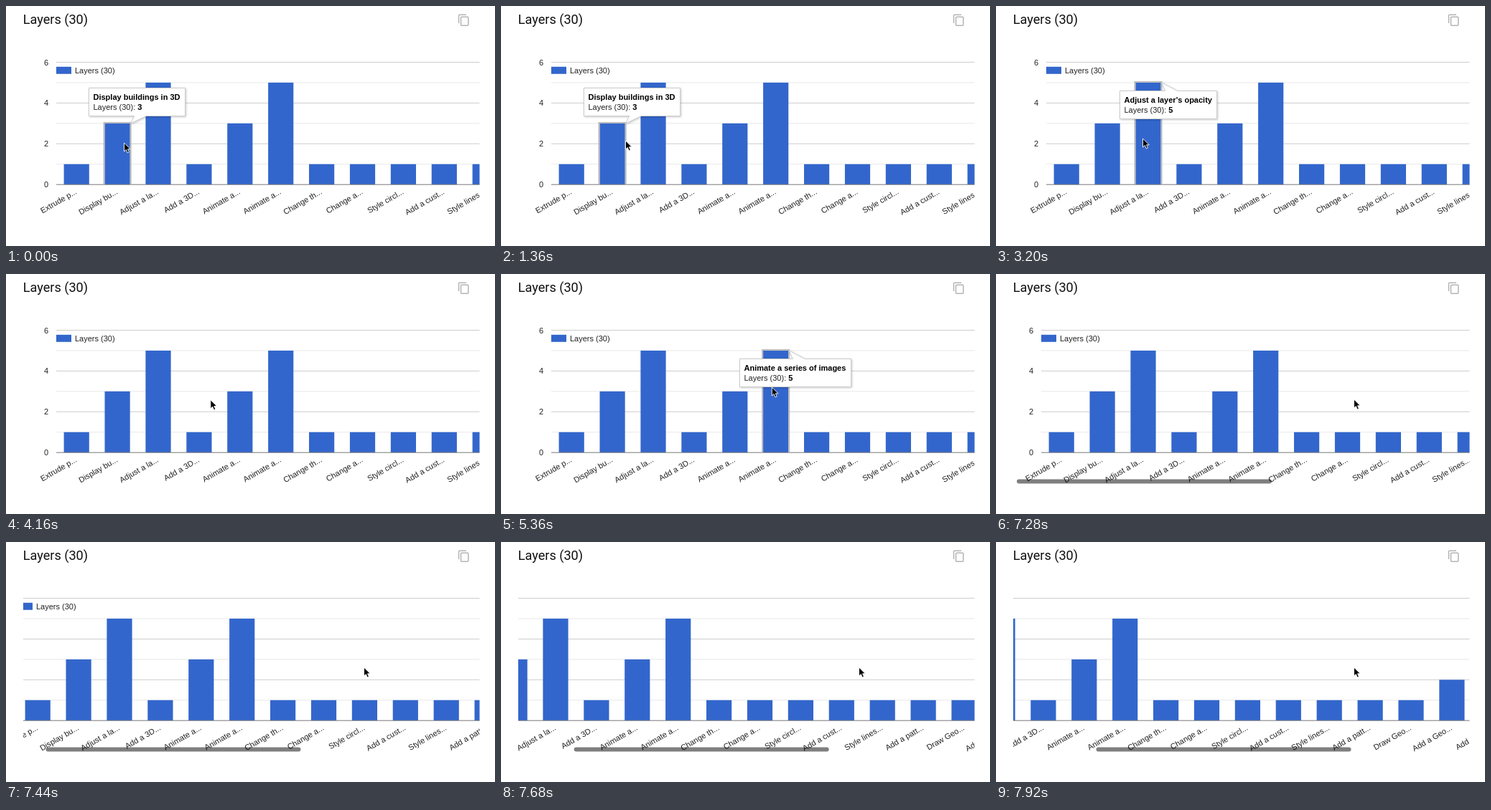
These frames come from a looping animation (681 px wide and 335 px high, 8000 ms). An HTML page:

```html
<!DOCTYPE html>
<html lang="en">
<head>
<meta charset="utf-8">
<title>Layers chart</title>
<style>
  html, body { margin: 0; width: 100%; height: 100%; overflow: hidden; background: #fff; }
  svg { display: block; width: 681px; height: 335px; }
  text { font: 11px "Liberation Sans", Arial, sans-serif; fill: #222; white-space: pre; }
  .heading { font: 18.1px Roboto, sans-serif; fill: #111; }
  .bold { font-weight: bold; fill: #000; }
  .end { text-anchor: end; }
  .box { filter: drop-shadow(1px 1px 1.5px rgba(0, 0, 0, .22)); }
</style>
</head>
<body>
<svg viewBox="0 0 681 335">
  <defs><clipPath id="view"><rect x="24" y="40" width="635.5" height="280"/></clipPath></defs>
  <text class="heading" x="23.8" y="24.7">Layers (30)</text>
  <g fill="none" stroke="#b4b4b4" stroke-width="1.5">
    <path d="M630.5 24V13.3q0-1 1-1H641"/>
    <rect x="633.5" y="15.3" width="10.3" height="12" rx="1"/>
  </g>
  <g clip-path="url(#view)">
    <g id="chart"></g>
    <rect id="thumb" y="286.5" width="355" height="6" rx="3" fill="#000" fill-opacity=".5"/>
  </g>
  <path id="cursor" d="M0 0V12L2.8 9.5L4.7 14L6.9 13L5 8.8H8.8Z" fill="#000" stroke="#fff" stroke-width=".9"/>
</svg>
<script>
const LOOP = 8000, STEP = 80;
const BASE = 249.2, UNIT = 28.45, LEFT = 80.6, PITCH = 56.9, BAR = 35.2;
const bars = [
  ['Extrude p', 1], ['Display bu', 3, 'Display buildings in 3D'],
  ['Adjust a la', 5, "Adjust a layer's opacity"], ['Add a 3D', 1],
  ['Animate a', 3, 'Animate a point'], ['Animate a', 5, 'Animate a series of images'],
  ['Change th', 1], ['Change a', 1], ['Style circl', 1], ['Add a cust', 1],
  ['Style lines', 1], ['Add a patt', 1], ['Draw Geo', 1], ['Add a Geo', 2], ['Add a line', 1]
];
// [start, end, bar index]
const hovers = [[0, 1520, 1], [1520, 4000, 2], [4240, 5040, 4], [5040, 6960, 5]];
// [time, x, y]
const pointer = [
  [0, 164.5, 191], [800, 164.5, 191], [1360, 173.5, 188], [1840, 204.5, 185], [3760, 204.5, 185],
  [4320, 317, 172], [4720, 325, 168], [5200, 377, 158], [6320, 379, 158],
  [6800, 425, 166], [7120, 498.5, 175]
];
// [time, offset]
const scroll = [[7200, 0], [7280, 7], [7360, 28], [7440, 54], [7600, 111], [7760, 161], [7920, 203]];

const byId = id => document.getElementById(id);
const chart = byId('chart');
const barX = i => LEFT + i * PITCH;
const valueY = v => BASE - v * UNIT;

function add(parent, tag, attrs, text) {
  const el = document.createElementNS('http://www.w3.org/2000/svg', tag);
  for (const name in attrs) el.setAttribute(name, attrs[name]);
  if (text) el.textContent = text;
  return parent.appendChild(el);
}

function gridLine(v, stroke) {
  add(chart, 'path', { d: `M70 ${valueY(v)}H1130`, stroke });
}

function drawChart() {
  for (let v = 1; v <= 6; v++) gridLine(v, v % 2 ? '#e8e8e8' : '#ccc');
  for (let v = 0; v <= 6; v += 2) {
    add(chart, 'text', { class: 'end', x: 59, y: valueY(v) + 4 }, String(v));
  }
  add(chart, 'rect', { x: 70, y: 84.8, width: 21, height: 10, fill: '#3366cc' });
  add(chart, 'text', { x: 96, y: 93.6 }, 'Layers (30)');
  bars.forEach(([label, value], i) => {
    const x = barX(i), y = valueY(value);
    add(chart, 'rect', { x, y, width: BAR, height: BASE - y, fill: '#3366cc' });
    add(chart, 'text', {
      class: 'end', transform: `translate(${x + BAR / 2 + 1.2} 261.5) rotate(-30)`
    }, label + '...');
  });
}

function makeTip(i) {
  const [, value, title] = bars[i];
  const x = barX(i), y = valueY(value), tipX = x + BAR + 1;
  const group = add(chart, 'g', { visibility: 'hidden' });
  add(group, 'path', {
    d: `M${x - 1} ${BASE}V${y - 1}H${x + BAR + 1}V${BASE}`,
    fill: 'none', stroke: '#b8b8b8', 'stroke-width': 1.8
  });
  const box = add(group, 'path', { class: 'box', fill: '#fff', stroke: '#ccc' });
  const above = value < 5;
  const top = Math.round(above ? y - 50 : y + 11) + .5, bottom = top + 39;
  const heading = add(group, 'text', { class: 'bold', y: top + 16 }, title);
  const width = Math.round(heading.getComputedTextLength() + 13);
  const left = Math.round(tipX + 9.5 - width / 2) - .5, right = left + width;
  heading.setAttribute('x', left + 6);
  const detail = add(group, 'text', { x: left + 6, y: top + 30 }, 'Layers (30): ');
  add(detail, 'tspan', { class: 'bold' }, String(value));
  const a = tipX + 5, b = tipX + 22;
  box.setAttribute('d', above
    ? `M${left} ${top}H${right}V${bottom}H${b}L${tipX} ${y}L${a} ${bottom}H${left}Z`
    : `M${left} ${top}H${a}L${tipX} ${y}L${b} ${top}H${right}V${bottom}H${left}Z`);
  return group;
}

// Piecewise linear value of one column of a key list.
function at(keys, t, col) {
  const next = keys.findIndex(k => k[0] > t);
  if (next === 0) return keys[0][col];
  if (next < 0) return keys[keys.length - 1][col];
  const p = keys[next - 1], q = keys[next];
  return p[col] + (q[col] - p[col]) * (t - p[0]) / (q[0] - p[0]);
}

drawChart();
const tips = hovers.map(([start, end, i]) => ({ start, end, el: makeTip(i) }));
gridLine(0, '#777');
tips.forEach(tip => chart.append(tip.el));

const origin = performance.now();
function render() {
  const elapsed = (performance.now() - origin) % LOOP;
  const t = Math.floor(elapsed / STEP) * STEP;
  const offset = at(scroll, t, 1);
  chart.setAttribute('transform', `translate(${-offset} 0)`);
  byId('thumb').setAttribute('x', 25 + offset * .564);
  byId('thumb').setAttribute('visibility', offset > 0 ? 'visible' : 'hidden');
  byId('cursor').setAttribute('transform', `translate(${at(pointer, t, 1)} ${at(pointer, t, 2)})`);
  for (const { start, end, el } of tips) {
    el.setAttribute('visibility', t >= start && t < end ? 'visible' : 'hidden');
  }
  requestAnimationFrame(render);
}
render();
</script>
</body>
</html>
```
